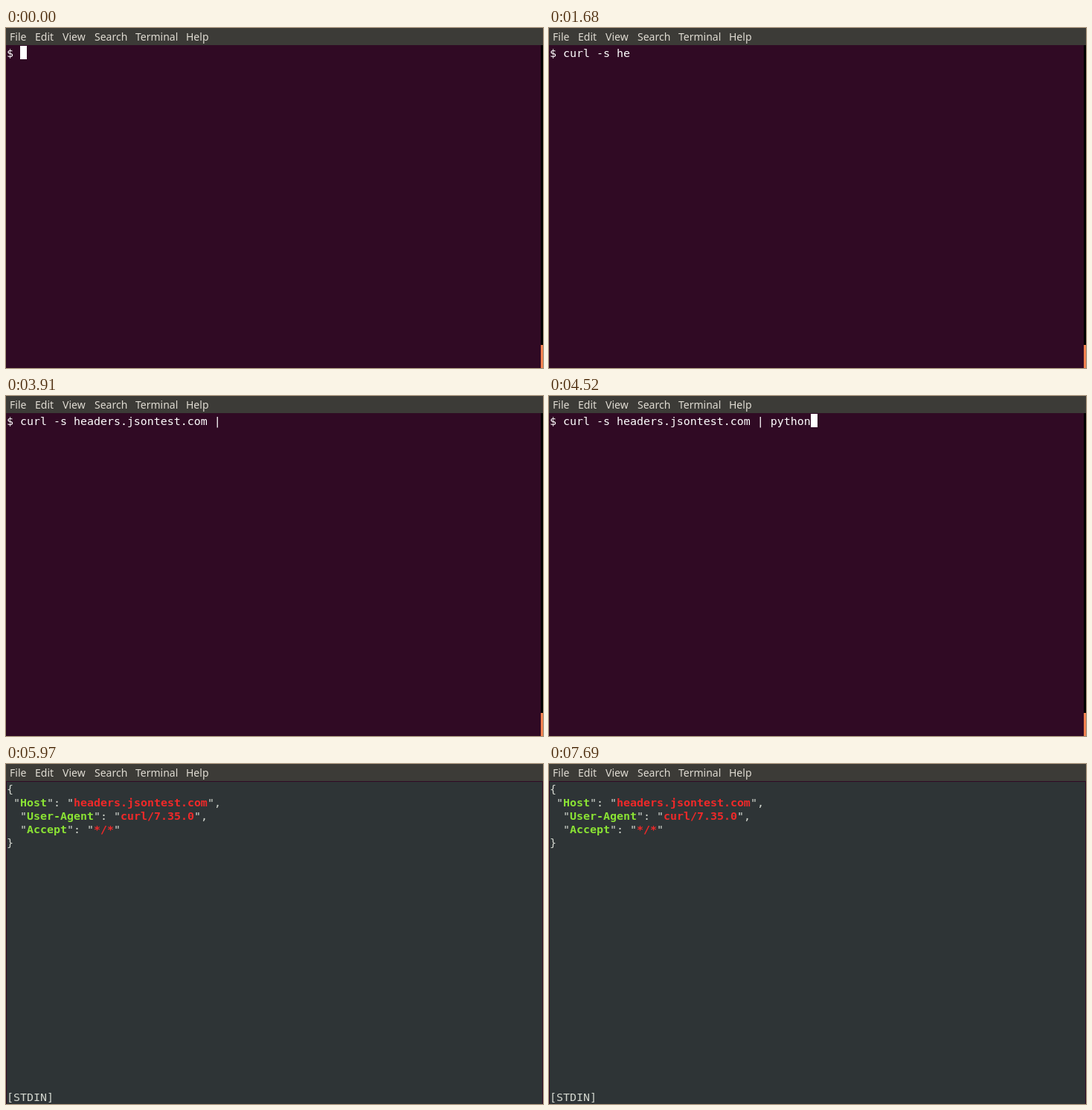
Write an HTML page that moves like this. It is 722x457 px and loops after 8 s.

```html
<!DOCTYPE html>
<html lang="en">
<head>
<meta charset="utf-8">
<title>Terminal</title>
<style>
  html, body { margin: 0; width: 100%; height: 100%; overflow: hidden; background: #300a24; }
  svg { display: block; width: 722px; height: 457px; }
  text { white-space: pre; }
  .menu { font: 14px "Noto Sans", "Open Sans", sans-serif; fill: #dfdbd2; }
  .mono { font: 14.95px "DejaVu Sans Mono", monospace; fill: #fff; }
  .page { fill: #d3d7cf; }
  .key { font-weight: bold; fill: #8ae234; }
  .value { font-weight: bold; fill: #ef2929; }
</style>
</head>
<body>
<svg viewBox="0 0 722 457" xmlns="http://www.w3.org/2000/svg">
  <rect width="722" height="457" fill="#300a24"/>
  <rect width="722" height="23" fill="#3c3b37"/>
  <g id="menu" class="menu"></g>
  <g id="shell">
    <rect x="719" y="23" width="3" height="403" fill="#000"/>
    <rect x="719" y="426" width="3" height="31" fill="#f0814f"/>
    <g id="prompt">
      <text id="line" class="mono" x="1" y="39"></text>
      <rect id="cursor" y="24" width="9" height="18" fill="#fff"/>
    </g>
  </g>
  <g id="viewer">
    <rect x="1" y="24" width="720" height="433" fill="#2e3436"/>
  </g>
</svg>
<script>
const LOOP = 8000, CELL_W = 9, CELL_H = 18, LEFT = 1, BASELINE = 39;
const CLEAR_AT = 5870, VIEWER_AT = 5970;
const COMMAND = "curl -s headers.jsontest.com | python | vim";

// [time, characters typed, cursor visible]
const STEPS = [
  [0, 0, 1], [290, 1, 1], [370, 2, 1], [450, 3, 1], [780, 4, 1],
  [1060, 6, 0], [1390, 7, 0], [1680, 10, 0], [1760, 12, 0], [2020, 14, 0],
  [2200, 15, 0], [2360, 16, 1],
  ...burst(2550, 80, 17, 6),
  [3090, 23, 1], [3170, 24, 1], [3250, 26, 0], [3390, 27, 0], [3520, 28, 0],
  [3910, 30, 0],
  ...burst(4180, 68, 32, 6),
  [4750, 38, 1],
  ...burst(4960, 90, 39, 4), [5320, 43, 0]
];

const $ = id => document.getElementById(id);

function burst(start, gap, typed, count) {
  return Array.from({ length: count }, (_, i) => [start + i * gap, typed + i, 1]);
}

function add(parent, tag, attrs, content = "") {
  const node = document.createElementNS("http://www.w3.org/2000/svg", tag);
  for (const name in attrs) node.setAttribute(name, attrs[name]);
  node.textContent = content;
  return parent.appendChild(node);
}

function addCells(content, col, row, style = "page") {
  add($("viewer"), "text", {
    class: "mono " + style, x: LEFT + col * CELL_W, y: BASELINE + row * CELL_H
  }, content);
}

function addPair(row, col, key, value, end) {
  const valueCol = col + key.length + 5;
  addCells('"', col, row);
  addCells(key, col + 1, row, "key");
  addCells('": "', col + 1 + key.length, row);
  addCells(value, valueCol, row, "value");
  addCells('"' + end, valueCol + value.length, row);
}

const MENU = { File: 5, Edit: 39, View: 76, Search: 119, Terminal: 174, Help: 242 };
for (const label in MENU) add($("menu"), "text", { x: MENU[label], y: 17 }, label);

addCells("{", 0, 0);
addPair(1, 1, "Host", "headers.jsontest.com", ",");
addPair(2, 2, "User-Agent", "curl/7.35.0", ",");
addPair(3, 2, "Accept", "*/*", "");
addCells("}", 0, 4);
addCells("[STDIN]", 0, 23);

function show(id, visible) {
  $(id).setAttribute("visibility", visible ? "visible" : "hidden");
}

function render(t) {
  const [, typed, cursorOn] = STEPS.findLast(step => step[0] <= t);
  const inShell = t < CLEAR_AT;
  $("line").textContent = "$ " + COMMAND.slice(0, typed);
  $("cursor").setAttribute("x", LEFT + (typed + 2) * CELL_W);
  show("shell", inShell);
  show("cursor", inShell && cursorOn);
  show("viewer", t >= VIEWER_AT);
}

const start = performance.now();
function tick() {
  render((performance.now() - start) % LOOP);
  requestAnimationFrame(tick);
}
tick();
</script>
</body>
</html>
```
